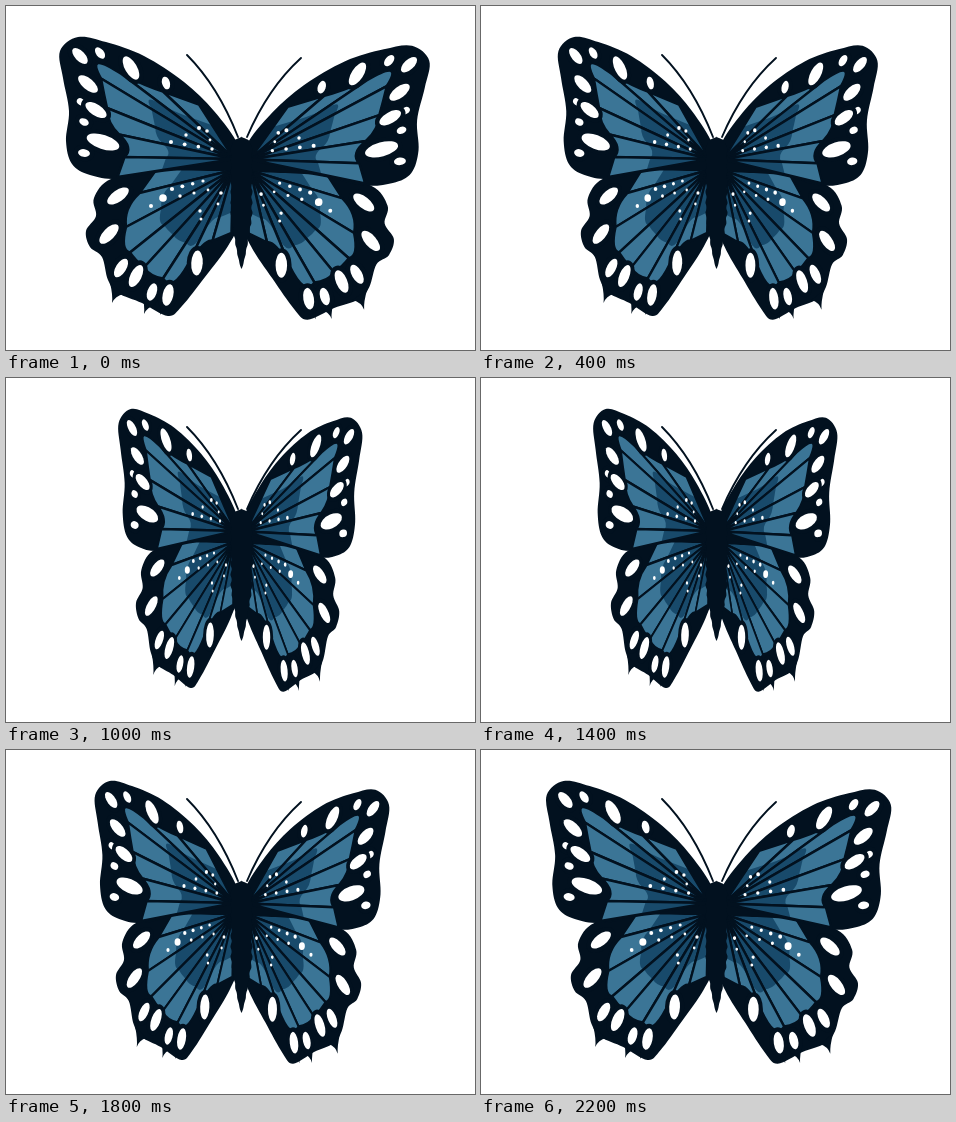
Write an HTML page that moves like this. It is 469x344 px and loops after 2400 ms.

```html
<!DOCTYPE html>
<html lang="en">
<head>
<meta charset="utf-8">
<title>Butterfly</title>
<style>
  html, body { margin: 0; width: 100%; height: 100%; overflow: hidden; background: #fff; }
  svg { display: block; width: 469px; height: 344px; }
</style>
</head>
<body>
<svg viewBox="0 0 469 344">
  <defs><g id="wing"></g></defs>
  <g id="left"><use href="#wing"/></g>
  <g id="right"><use href="#wing" transform="rotate(3 235 150) translate(472 0) scale(-1 1)"/></g>
  <g id="body"></g>
</svg>
<script>
const INK = '#02111f', LIGHT = '#3b7596', DEEP = '#184a6b', WHITE = '#fff';
const $ = id => document.getElementById(id);
const mix = (a, b, t) => a.map((v, k) => v + (b[k] - v) * t);
const points = text => text.trim().split(/\s+/).map(p => p.split(',').map(Number));

function add(parent, tag, attrs) {
  const el = document.createElementNS('http://www.w3.org/2000/svg', tag);
  for (const key in attrs) el.setAttribute(key, attrs[key]);
  parent.appendChild(el);
}

// Closed Catmull-Rom curve.
function blob(parent, pts) {
  const at = i => pts[(i + pts.length) % pts.length];
  let d = 'M' + pts[0];
  pts.forEach((p, i) => {
    const a = at(i - 1), n = at(i + 1), b = at(i + 2);
    const c1 = p.map((v, k) => v + (n[k] - a[k]) / 6);
    const c2 = n.map((v, k) => v - (b[k] - p[k]) / 6);
    d += `C${c1} ${c2} ${n}`;
  });
  add(parent, 'path', { d: d + 'Z', fill: INK });
}

// Petal-shaped cells from the root to each tip, with a darker rounded base.
function cells(parent, root, tips, depth) {
  tips.forEach((tip, i) => {
    const prev = tips[i - 1] || mix(tips[1], tip, 2);
    const next = tips[i + 1] || mix(tips[i - 1], tip, 2);
    const a = mix(prev, tip, 0.5), b = mix(tip, next, 0.5);
    const bulge = mix(mix(a, b, 0.5), tip, 2);
    const petal = (size, attrs) => {
      const [p, q, r] = [a, bulge, b].map(v => mix(root, v, size));
      add(parent, 'path', { d: `M${root}L${p}Q${q} ${r}Z`, ...attrs });
    };
    petal(1, { fill: LIGHT });
    petal(depth, { fill: DEEP });
    petal(1, { fill: 'none', stroke: INK, 'stroke-width': 2.5, 'stroke-linejoin': 'round' });
  });
}

// Oval spots (x, y, half length) that point towards one place.
function spots(parent, aim, list) {
  for (const [x, y, size] of list) {
    const tilt = Math.atan2(aim[1] - y, aim[0] - x) * 180 / Math.PI;
    add(parent, 'ellipse', {
      cx: x, cy: y, rx: size, ry: size * 0.3 + 2, transform: `rotate(${tilt} ${x} ${y})`,
      fill: WHITE, stroke: INK, 'stroke-width': 9, 'paint-order': 'stroke'
    });
  }
}

function trail(parent, from, to, count, r1, r2) {
  for (let i = 0; i < count; i++) {
    const [cx, cy, r] = mix([...from, r1], [...to, r2], i / (count - 1));
    add(parent, 'circle', { cx, cy, r, fill: WHITE });
  }
}

function hindwing(g) {
  blob(g, points(`232,160 150,165 105,173 88,192 90,210 80,225 84,241 96,251 102,274
    112,287 136,297 162,310 176,300 199,271 222,240 232,215`));
  for (const [x, y] of points('106,297 138,308 154,309'))
    add(g, 'path', { d: `M${x - 2} ${y - 20}Q${x + 1} ${y - 8} ${x} ${y}Q${x + 3} ${y - 7} ${x + 12} ${y - 9}Z`, fill: INK });
  cells(g, [227, 164], points('145,171 122,203 118,239 130,254 146,269 168,276 197,239 216,231'), 0.67);
  spots(g, [198, 130], points('112,190,12.5 103,228,12.5 115,262,10.5 130,270,12 146,286,9 162,289,11 191,257,12.5'));
  trail(g, [157, 192], [145, 200], 2, 3.8, 2);
  trail(g, [166, 183], [197, 175], 4, 2.1, 1.6);
  trail(g, [174, 190], [202, 184], 3, 1.7, 1.4);
  trail(g, [194, 205], [195, 213], 2, 1.7, 1.5);
  trail(g, [215, 187], [212, 198], 2, 1.8, 1.4);
}

function forewing(g) {
  blob(g, points(`232,139 208,105 178,76 138,50 100,36 72,31 54,45 57,72
    63,105 60,135 66,158 84,169 115,173 165,165 232,163`));
  cells(g, [228, 153], points('175,92 139,79 92,57 98,88 104,116 122,141 115,161'), 0.62);
  spots(g, [185, 165], points(`74,50,10 94,47,6.5 125,62,13 160,77,6.5 82,78,12
    75,96,4.5 90,104,12 78,116,5 97,136,17 78,147,6`));
  trail(g, [165, 136], [206, 143], 4, 2, 1.7);
  trail(g, [180, 129], [204, 134], 2, 1.7, 1.4);
  trail(g, [193, 122], [201, 125], 2, 2, 1.8);
}

function torso(g) {
  for (const d of ['M181 49Q212 80 232 131', 'M295 52Q262 82 241 131'])
    add(g, 'path', { d, fill: 'none', stroke: INK, 'stroke-width': 1.9, 'stroke-linecap': 'round' });
  const top = 131, height = 132, sides = [[], []];
  for (let y = 0; y <= height; y += 3) {
    const t = y / height;
    const taper = Math.sqrt(Math.min(1, t / 0.06)) * Math.min(1, (1 - t) / 0.4) ** 0.75;
    const half = (10.4 + 0.7 * Math.sin(y * 0.6)) * taper;
    sides[0].push([235.5 + half, top + y]);
    sides[1].unshift([235.5 - half, top + y]);
  }
  blob(g, sides.flat());
}

hindwing($('wing'));
forewing($('wing'));
torso($('body'));

const STEP = 200, COUNT = 12;
const squash = (x, s) => `translate(${x} 0) scale(${s} 1) translate(${-x} 0)`;

function draw(ms) {
  const i = Math.floor(ms / STEP) % COUNT;
  const fold = Math.min(i, COUNT - i);
  $('left').setAttribute('transform', squash(230, 1 - fold / 15));
  $('right').setAttribute('transform', squash(233.5, 1 - fold * 0.0708));
}

const start = performance.now();
function tick() {
  draw(performance.now() - start);
  requestAnimationFrame(tick);
}
tick();
</script>
</body>
</html>
```
